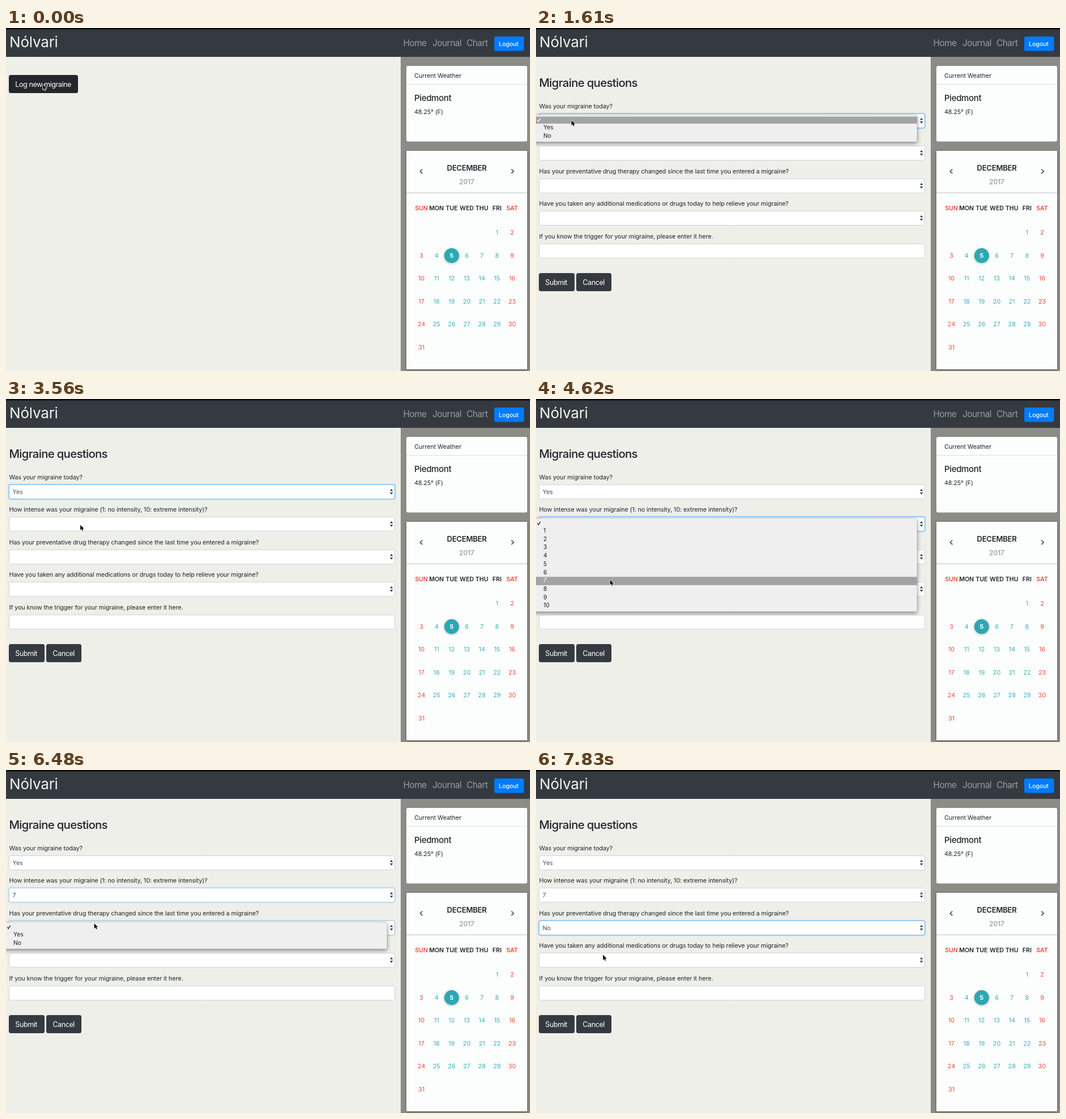
Write an HTML page with a canvas that moves like this. It is 924x606 px and loops after 8000 ms.

```html
<!DOCTYPE html>
<html lang="en">
<head>
<meta charset="utf-8">
<title>Migraine log</title>
<style>
html, body { margin: 0; width: 100%; height: 100%; overflow: hidden; background: #eeefe9; }
canvas { display: block; width: 924px; height: 606px; }
</style>
</head>
<body>
<canvas id="stage"></canvas>
<script>
const W = 924, H = 606, LOOP = 8000;
const canvas = document.getElementById('stage');
const ctx = canvas.getContext('2d');
const dpr = window.devicePixelRatio || 1;
canvas.width = W * dpr;
canvas.height = H * dpr;

const INK = '#212529', DARK = '#343a40', CARD = '#fcfdfd', TEAL = '#35b3bd', RED = '#f04a3c';
const LABELS = [
  'Was your migraine today?',
  'How intense was your migraine (1: no intensity, 10: extreme intensity)?',
  'Has your preventative drug therapy changed since the last time you entered a migraine?',
  'Have you taken any additional medications or drugs today to help relieve your migraine?',
  'If you know the trigger for your migraine, please enter it here.'
];
const YES_NO = ['Yes', 'No'];
const OPTIONS = [YES_NO, Array.from({ length: 10 }, (_, i) => String(i + 1)), YES_NO];
const DAYS = ['SUN', 'MON', 'TUE', 'WED', 'THU', 'FRI', 'SAT'];

// Each step: time, pointer x, pointer y, changed state.
// hot: highlighted menu row, 0 is the blank one, -1 is none.
const START = { form: false, open: -1, hot: -1, fade: 1, values: [], focus: [] };
const STEPS = [
  [0, 65, 99.5, {}],
  [150, 65, 99.5, { form: true }],
  [380, 64.5, 97, {}],
  [830, 64, 108, {}],
  [1010, 63, 138, {}],
  [1160, 62.5, 163, {}],
  [1610, 62.5, 163, { open: 0, hot: 0, focus: [1] }],
  [1900, 62.5, 172, { hot: 1 }],
  [2050, 62.5, 176, {}],
  [2650, 62.5, 176, { fade: 0.1 }],
  [2790, 62.5, 176, { open: -1, fade: 1, values: ['Yes'] }],
  [3270, 70, 184, {}],
  [3420, 108, 210, {}],
  [3560, 131, 222.5, {}],
  [4010, 131, 222.5, { open: 1, hot: -1, focus: [0, 1] }],
  [4160, 131, 241, { hot: 1 }],
  [4310, 131, 273, { hot: 4 }],
  [4460, 131, 304, { hot: 6 }],
  [4620, 130.5, 319.5, { hot: 7 }],
  [5070, 130.5, 319.5, { hot: -1 }],
  [5220, 130.5, 319.5, { hot: 7 }],
  [5370, 130.5, 319.5, { fade: 0.08 }],
  [5550, 130.5, 319.5, { open: -1, fade: 1, values: ['Yes', '7'] }],
  [5700, 137, 304, {}],
  [5860, 149, 284, {}],
  [6030, 154, 272, {}],
  [6180, 155.5, 271, {}],
  [6480, 155.5, 271, { open: 2, hot: -1, focus: [0, 0.45, 0.4] }],
  [6630, 154, 273, { hot: 0, focus: [0, 0, 1] }],
  [6780, 143, 284, { hot: 1 }],
  [6930, 127, 297, { hot: 2 }],
  [7080, 120, 302, {}],
  [7680, 119, 306, { fade: 0.3 }],
  [7830, 118, 326.5, { open: -1, fade: 1, values: ['Yes', '7', 'No'] }]
];

function stateAt(t) {
  const s = { ...START };
  for (const [time, x, y, change] of STEPS) {
    if (time > t) break;
    Object.assign(s, change, { x, y });
  }
  return s;
}

function text(str, x, y, { size = 10.8, gap = -0.1, color = INK, weight = 400, align = 'left' } = {}) {
  ctx.font = `${weight} ${size}px Inter, Roboto, sans-serif`;
  ctx.letterSpacing = gap + 'px';
  ctx.textAlign = align;
  ctx.fillStyle = color;
  ctx.fillText(str, x, y);
}

function box(x, y, w, h, r, fill, stroke) {
  ctx.beginPath();
  ctx.roundRect(x, y, w, h, r);
  if (fill) { ctx.fillStyle = fill; ctx.fill(); }
  if (stroke) { ctx.strokeStyle = stroke; ctx.lineWidth = 1; ctx.stroke(); }
}

function rect(x, y, w, h, fill) {
  ctx.fillStyle = fill;
  ctx.fillRect(x, y, w, h);
}

function poly(points, fill) {
  ctx.beginPath();
  points.forEach(([x, y]) => ctx.lineTo(x, y));
  ctx.closePath();
  ctx.fillStyle = fill;
  ctx.fill();
}

function line(points, color, width) {
  ctx.beginPath();
  points.forEach(([x, y]) => ctx.lineTo(x, y));
  ctx.strokeStyle = color;
  ctx.lineWidth = width;
  ctx.stroke();
}

function shadow(color, blur, dy) {
  ctx.shadowColor = color;
  ctx.shadowBlur = blur * dpr;
  ctx.shadowOffsetY = dy * dpr;
}

function noShadow() {
  shadow('transparent', 0, 0);
}

function button(label, x, y, w, color) {
  box(x, y, w, 32, 3.5, color);
  text(label, x + 11.3, y + 21, { size: 12.6, gap: -0.45, color: '#fff' });
}

function navbar() {
  rect(0, 0, W, 51, DARK);
  rect(0, 0, W, 2.5, '#08090a');
  text('Nólvari', 6, 34, { size: 26, gap: -0.2, color: '#f1f2ee' });
  const link = { size: 15.3, gap: -0.45, color: '#999c9f' };
  text('Home', 700.5, 32, link);
  text('Journal', 752, 32, link);
  text('Chart', 812, 32, link);
  box(861, 15, 52.5, 25.5, 3, '#007bff');
  text('Logout', 869, 31.5, { size: 10.6, weight: 500, color: '#fff' });
}

function weather() {
  box(706, 67, 213, 133.5, 3, CARD);
  rect(706, 99, 213, 1, '#dcdddc');
  text('Current Weather', 720, 87.5);
  text('Piedmont', 720, 129, { size: 15, gap: -0.35, weight: 500 });
  text('48.25° (F)', 720, 152);
}

function calendar() {
  shadow('rgba(0,0,0,.35)', 4, 1);
  box(706, 217, 213, 386, 1, CARD);
  noShadow();
  rect(706, 290, 213, 2, '#dfe0e0');
  rect(706, 292, 213, 1, '#f1f2f2');
  line([[734.3, 249.5], [730.3, 253.3], [734.3, 257.1]], '#3c4043', 1.5);
  line([[891.2, 249.5], [895.2, 253.3], [891.2, 257.1]], '#3c4043', 1.5);
  text('DECEMBER', 812.5, 252, { size: 13, gap: -0.2, weight: 600, align: 'center' });
  text('2017', 812.5, 276, { size: 12.2, gap: 0, color: '#85888a', align: 'center' });

  const colX = c => 732.5 + c * 26.67;
  const isEnd = c => c % 6 === 0;
  DAYS.forEach((d, c) => text(d, colX(c), 322,
    { size: 10.6, gap: 0, weight: 600, color: isEnd(c) ? RED : INK, align: 'center' }));

  const today = 5;
  for (let day = 1; day <= 31; day++) {
    const cell = day + 4, c = cell % 7, y = 361 + 40.6 * Math.floor(cell / 7);
    const on = day === today;
    if (on) {
      shadow('rgba(0,0,0,.3)', 4, 1);
      box(colX(c) - 13, y - 12.5, 26, 26, 13, '#2ba8b2');
      noShadow();
    }
    text(String(day), colX(c), Math.round(y + 4), {
      gap: 0, align: 'center', weight: on ? 700 : 400,
      color: on ? '#fff' : isEnd(c) ? RED : TEAL
    });
  }
}

const rowY = i => Math.round(57.45 * i);

function field(i, value, focus) {
  const y = 151.5 + rowY(i);
  if (focus) {
    ctx.globalAlpha = focus;
    box(3.7, y - 1.8, 683.6, 28.6, 4.5, '#b4d3f6');
    ctx.globalAlpha = 1;
  }
  box(5.5, y, 680, 25, 3, '#fff', '#d0d4d6');
  if (focus) {
    ctx.globalAlpha = focus;
    box(5.5, y, 680, 25, 3, null, '#80bdff');
    ctx.globalAlpha = 1;
  }
  if (value) text(value, 11.5, y + 16.5, { color: '#495057' });
  if (i < 4) {
    const m = y + 12.3;
    poly([[677, m - 1.2], [682.4, m - 1.2], [679.7, m - 5]], DARK);
    poly([[677, m + 1.2], [682.4, m + 1.2], [679.7, m + 5]], DARK);
  }
}

function form(s) {
  text('Migraine questions', 5.5, 104, { size: 20.3, gap: -0.65, weight: 500 });
  LABELS.forEach((label, i) => {
    text(label, 5.5, 142 + rowY(i));
    field(i, s.values[i], s.focus[i]);
  });
  button('Submit', 5, 433, 63, DARK);
  button('Cancel', 71, 433, 62, DARK);
}

function menu(s) {
  const list = OPTIONS[s.open], top = 151 + rowY(s.open), rowH = 14.7;
  const first = top + 18, end = first + rowH * list.length;
  ctx.globalAlpha = s.fade;
  shadow('rgba(0,0,0,.45)', 7, 2.5);
  box(-6, top + 2.8, 678, end - top, 3, '#efefef');
  noShadow();
  box(-6, top + 2.8, 678, end - top, 3, null, 'rgba(0,0,0,.12)');
  if (s.hot === 0) rect(0, top + 5.5, 672, 12.5, '#a3a3a5');
  if (s.hot > 0) rect(0, first + rowH * (s.hot - 1), 672, rowH, '#a3a3a5');
  const cy = top + 11.8;
  line([[2.3, cy], [4.2, cy + 2.3], [7.7, cy - 3]], s.hot === 0 ? '#fff' : '#1c1c1c', 1.4);
  list.forEach((option, i) => text(option, 13, Math.round(first + rowH * i + 10), {
    size: 10.3, gap: 0, color: s.hot === i + 1 ? '#fff' : '#1c1c1c'
  }));
  ctx.globalAlpha = 1;
}

function pointer(x, y) {
  const shape = [[0, 0], [0, 9.2], [2.1, 7.3], [3.6, 10.6], [5.3, 9.8], [3.9, 6.7], [6.7, 6.5]]
    .map(([dx, dy]) => [x + dx, y + dy]);
  ctx.lineJoin = 'round';
  line([...shape, shape[0]], '#fff', 1.6);
  ctx.lineJoin = 'miter';
  poly(shape, '#111');
}

function draw(t) {
  const s = stateAt(t);
  ctx.setTransform(dpr, 0, 0, dpr, 0, 0);
  rect(0, 0, W, H, '#eeefe9');
  rect(696, 51, 228, 555, '#8a8c85');
  navbar();
  weather();
  calendar();
  if (s.form) form(s);
  else button('Log new migraine', 5, 83, 122, '#23272b');
  if (s.open >= 0) menu(s);
  pointer(s.x, s.y);
}

const begin = performance.now();
function tick() {
  draw((performance.now() - begin) % LOOP);
  requestAnimationFrame(tick);
}
tick();
</script>
</body>
</html>
```
